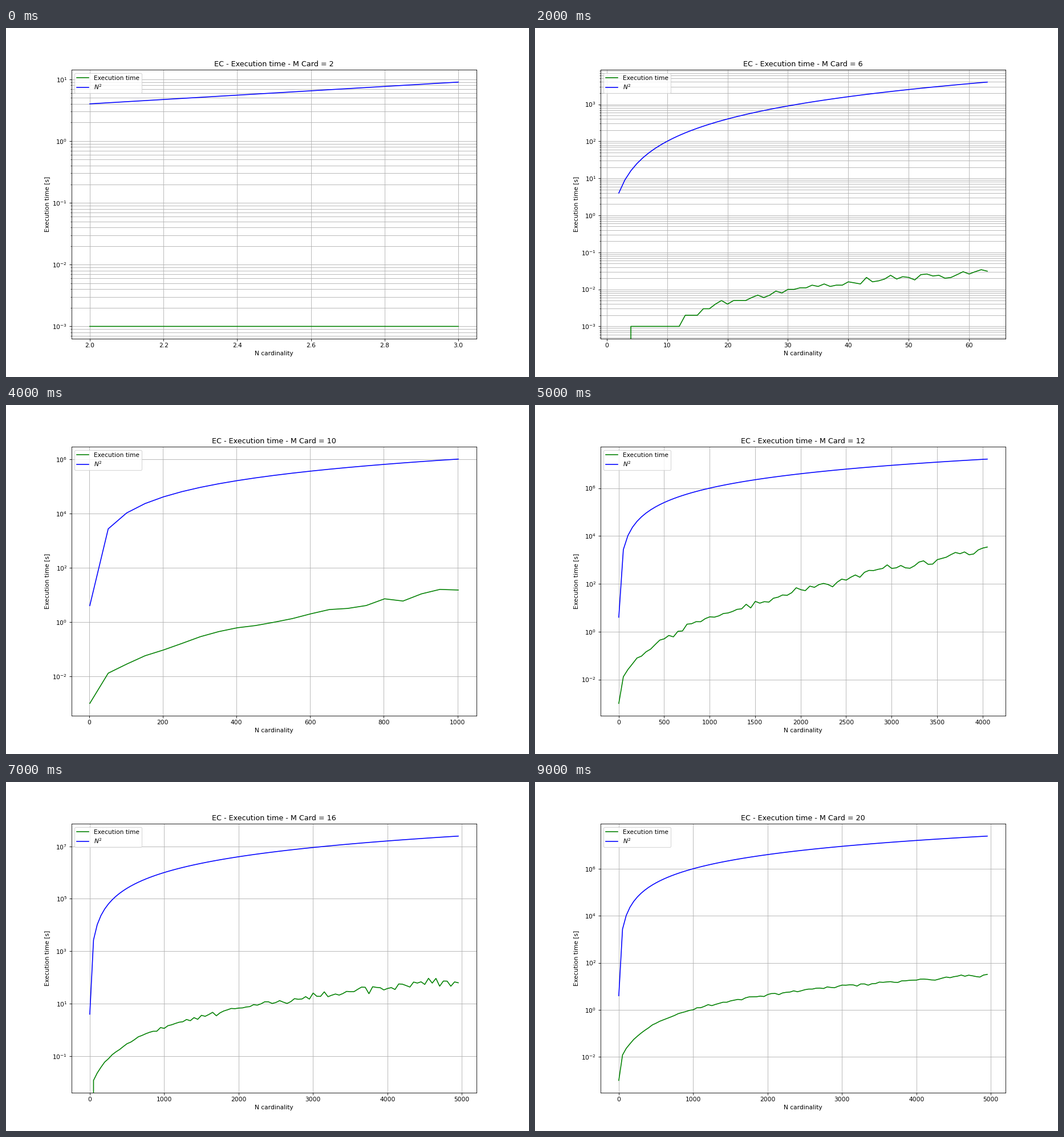
Animation, 917 px wide and 611 px high, one loop 9500 ms. Source, as a matplotlib script:

```python
import numpy as np
import matplotlib.pyplot as plt
from matplotlib.animation import FuncAnimation

W, H, DPI = 917, 611, 76.375
CARDS = range(2, 21)

# Values of N whose run was too short for the clock, per M
UNTIMED = {4: [3], 6: [2, 3], 8: [2], 14: [2], 15: [2], 16: [2], 18: [2]}


def sizes(m):
    return np.arange(2, min(2 ** m, 5000), 1 if m < 10 else 50)


def run_times(m, n):
    """Quadratic cost, growing exponentially as the problem gets denser."""
    base = 1e-6 * n ** 2 + .0135 * n ** 2 / (n ** 2 + 34 ** 2)
    lift = n / (60 + 10 * 2 ** (.62 * m))
    spread = .012 + .08 * np.tanh(2.5 * lift)
    noise = np.random.default_rng(m).normal(0, spread)
    ms = np.floor(1000 * base * 10 ** (lift + noise))
    ms = np.maximum(ms, 1)
    ms[np.isin(n, UNTIMED.get(m, []))] = 0
    return ms / 1000


def thin_ticks():
    """Label every second decade once nine or more are in view."""
    lo, hi = np.log10(ax.get_ylim())
    decades = np.floor(hi) - np.ceil(lo) + 1
    if decades >= 9:
        ax.set_yticks(10 ** np.arange(np.floor(lo) + 2, hi, 2))
        ax.minorticks_off()


fig, ax = plt.subplots(figsize=((W + 1e-6) / DPI, H / DPI), dpi=DPI)


def draw(i):
    m = CARDS[i]
    n = sizes(m).astype(float)
    ax.clear()
    ax.semilogy(n, run_times(m, n), "g", snap=False, label="Execution time")
    ax.semilogy(n, n ** 2, "b", snap=False, label="$N^2$")
    thin_ticks()
    ax.set_title(f"EC - Execution time - M Card = {m}")
    ax.set_xlabel("N cardinality")
    ax.set_ylabel("Execution time [s]")
    ax.grid(True, which="both")
    ax.legend(loc="upper left", labelspacing=.3)
    return ax.lines


anim = FuncAnimation(fig, draw, frames=len(CARDS), interval=500,
                     repeat=True, repeat_delay=0, blit=False)
plt.show()
```
